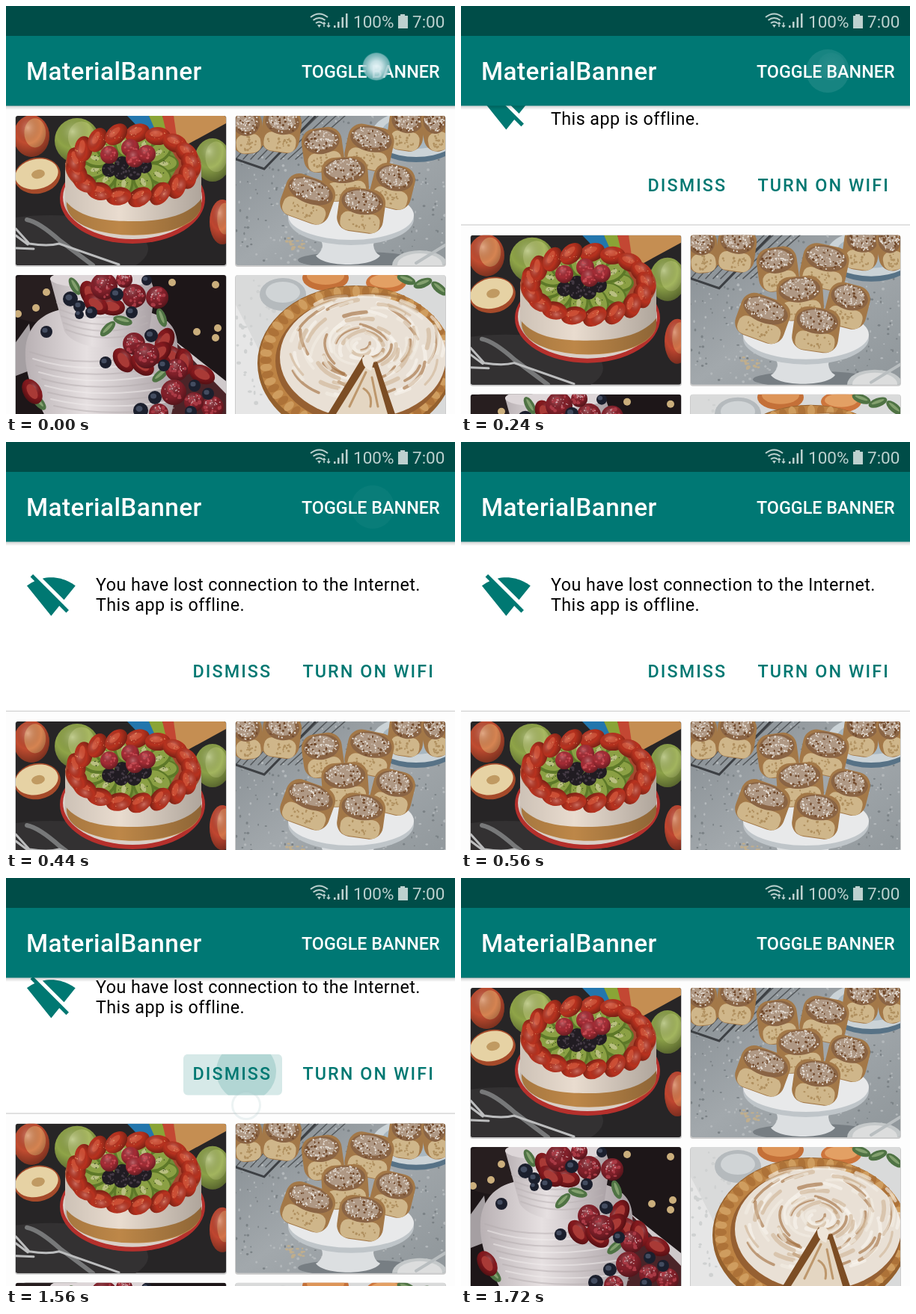
An HTML page for the animation above (2760 ms loop, 600 by 546 pixels).

```html
<!DOCTYPE html>
<html lang="en">
<head>
<meta charset="utf-8">
<style>
  html, body { margin: 0; width: 100%; height: 100%; overflow: hidden; background: #fdfdfd; }
  svg { display: block; width: 600px; height: 546px; font-family: Roboto, sans-serif; }
  .medium { font-weight: 500; font-size: 23.33px; }
  .title { font-size: 33.33px; letter-spacing: .417px; }
  .button { fill: #007872; letter-spacing: 2.083px; }
  .body { font-size: 23.33px; letter-spacing: .417px; }
  .status { font-size: 22.5px; }
</style>
</head>
<body>
<svg viewBox="0 0 600 546">
  <defs>
    <radialGradient id="glow">
      <stop offset="0" stop-color="#e4f3f6"/>
      <stop offset=".4" stop-color="#cfe6ea" stop-opacity=".95"/>
      <stop offset=".75" stop-color="#9cc8cc" stop-opacity=".85"/>
      <stop offset=".92" stop-color="#9cc8cc" stop-opacity=".7"/>
      <stop offset="1" stop-color="#9cc8cc" stop-opacity=".1"/>
    </radialGradient>
    <linearGradient id="shade" x2="0" y2="1">
      <stop stop-opacity=".2"/><stop offset="1" stop-opacity="0"/>
    </linearGradient>
    <linearGradient id="side">
      <stop stop-opacity=".12"/><stop offset=".4" stop-opacity="0"/><stop offset="1" stop-opacity=".25"/>
    </linearGradient>
    <radialGradient id="sphere" cx=".4" cy=".3" r=".75">
      <stop stop-color="#fff" stop-opacity=".3"/><stop offset=".5" stop-opacity="0"/><stop offset="1" stop-opacity=".4"/>
    </radialGradient>
    <linearGradient id="stone" x2="1" y2="1">
      <stop stop-color="#858c91"/><stop offset=".5" stop-color="#a2a8ac"/><stop offset="1" stop-color="#8f969a"/>
    </linearGradient>
    <linearGradient id="icing">
      <stop stop-color="#b9b1b4"/><stop offset=".4" stop-color="#e6e0e1"/><stop offset="1" stop-color="#a89fa3"/>
    </linearGradient>
    <clipPath id="buttonClip"><rect x="237" y="281" width="132" height="55" rx="6"/></clipPath>
  </defs>

  <g id="grid"></g>

  <g id="banner">
    <rect y="133" width="600" height="227" fill="#fff"/>
    <rect y="359.5" width="600" height="1.5" fill="#d8d8d8"/>
    <path transform="translate(27 173) scale(2.78)" fill="#007872" d="M23.64 7c-.45-.34-4.93-4-11.64-4-1.5 0-2.89.19-4.15.48L18.18 13.8 23.64 7zm-6.6 8.22L3.27 1.44 2 2.72l2.05 2.06C1.91 5.76.59 6.82.36 7L12 21.5l3.91-4.87 3.32 3.32 1.27-1.27z"/>
    <text class="body" x="120" y="199">You have lost connection to the Internet.</text>
    <text class="body" x="120" y="226">This app is offline.</text>
    <g clip-path="url(#buttonClip)" fill="#007872">
      <rect id="press" x="237" y="281" width="132" height="55"/>
      <circle id="spread" cx="321" cy="304"/>
    </g>
    <text class="medium button" x="249.5" y="315">DISMISS</text>
    <text class="medium button" x="396.5" y="315">TURN ON WIFI</text>
  </g>

  <rect y="133" width="600" height="6" fill="url(#shade)"/>
  <rect width="600" height="133.5" fill="#007874"/>
  <rect width="600" height="40" fill="#004d48"/>
  <g fill="#bdd1cf" stroke="#bdd1cf" stroke-width="0">
    <g fill="none" stroke-width="2">
      <path d="M407 15q11.500-9 23 0M410.500 19q8-6 16 0M414 23q4.500-3.500 9 0"/>
      <path d="M425 28v-6m-2 2 2-2 2 2M431 22v6m-2-2 2 2 2-2" stroke-width="1.500"/>
    </g>
    <path d="M416 25h5l-2.500 4zM438 26h2.500v3h-2.500zM443 21h2.500v8h-2.500zM448.500 15h2.500v14h-2.500zM454 10h2.500v19h-2.500zM527 11h6v2h4v17h-13V13h3z"/>
    <text class="status" x="464" y="29">100%</text>
    <text class="status" x="543" y="29">7:00</text>
  </g>
  <circle id="ripple" cx="490" cy="87" r="29" fill="#fff"/>
  <g class="medium" fill="#fff">
    <text class="title" x="27" y="99">MaterialBanner</text>
    <text x="395" y="96">TOGGLE BANNER</text>
  </g>
  <circle id="tap" cx="495" cy="81" r="19" fill="url(#glow)"/>
  <circle id="ring" cx="321" cy="304" r="18.500" fill="#fff" fill-opacity=".45" stroke="#b4cfd2" stroke-width="3"/>
</svg>

<script>
const $ = id => document.getElementById(id);
let seed = 7;
const rnd = (a = 0, b = 1) => {
  seed = seed * 16807 % 2147483647;
  return a + (b - a) * seed / 2147483647;
};
const repeat = (n, make) => Array.from({ length: n }, (_, i) => make(i)).join('');
const oval = (x, y, rx, ry, fill, turn = 0, more = '') =>
  `<ellipse cx="${x}" cy="${y}" rx="${rx}" ry="${ry}" fill="${fill}" transform="rotate(${turn} ${x} ${y})" ${more}/>`;
const ball = (x, y, rx, ry, fill, turn) => oval(x, y, rx, ry, fill, turn) + oval(x, y, rx, ry, 'url(#sphere)', turn);
const shape = (d, fill, more = '') => `<path d="${d}" fill="${fill}" ${more}/>`;
const line = (d, color, width, more = '') =>
  shape(d, 'none', `stroke="${color}" stroke-width="${width}" stroke-linecap="round" ${more}`);
const dust = (n, x, y, rx, ry, fill, size = 1) => repeat(n, () => {
  const a = rnd(0, 6.283), r = Math.sqrt(rnd());
  return oval(x + rx * r * Math.cos(a), y + ry * r * Math.sin(a), rnd(.4, 1) * size, rnd(.4, 1) * size, fill);
});
const each = (points, make) => points.map(p => make(...p)).join('');

const strawberry = (x, y, turn) =>
  ball(x, y, 17, 12, '#b8321f', turn) + oval(x - 2, y - 3, 9, 4, '#dc6244', turn, 'opacity=".6"') + dust(6, x, y, 12, 8, '#e59a6c', .8);
const halfBerry = (x, y, turn) =>
  ball(x, y, 18, 12, '#85191e', turn) + oval(x, y, 11, 6, '#a93a36', turn);
const raspberry = (x, y, r = 14) =>
  ball(x, y, r, r, '#83202a') + dust(12, x, y, r * .8, r * .8, '#a93a45', 3) + dust(14, x, y - r * .3, r * .7, r * .5, '#d5b0b5', 1.1);
const blueberry = (x, y, r = 8) =>
  oval(x, y, r, r, '#1b1f2d') + oval(x - 2, y - 2, r * .45, r * .4, '#434c60');
const leaf = (x, y, turn) => oval(x, y, 13, 6, '#4f7344', turn) + oval(x, y - 1, 9, 2, '#83a06e', turn);

const bun = (x, y, turn, w = 29) =>
  `<g transform="rotate(${turn} ${x} ${y})">
    <rect x="${x - w}" y="${y - 27}" width="${2 * w}" height="59" rx="18" fill="#a37848"/>
    <rect x="${x - w + 5}" y="${y + 6}" width="${2 * w - 9}" height="25" rx="10" fill="#cfb68a"/>
    ${dust(18, x, y + 18, w - 10, 9, '#b0905f', 2)}
    ${oval(x, y - 9, w - 3, 17, '#8a6444')}
    ${oval(x - 1, y - 11, w - 8, 13, '#d5ccc3', 0, 'opacity=".5"')}
    ${dust(60, x, y - 10, w - 5, 15, '#e4ddd5', 1.4)}
    ${dust(16, x, y - 8, w - 6, 14, '#71492b', 2)}
  </g>`;

const apple = (x, y, rx, ry, main, light) =>
  oval(x, y, rx, ry, main) + oval(x + rx * .2, y - ry * .15, rx * .6, ry * .7, light, 0, 'opacity=".55"') + oval(x, y, rx, ry, 'url(#sphere)');

const fruitCake = () =>
  shape('M13 147h281v200H13z', '#272526') + oval(60, 325, 130, 45, '#333132') +
  shape('M162 147h29l14 25-17 2z', '#2376ad') + shape('M191 147h18l9 25-15 2z', '#8aa436') +
  shape('M209 147h15l8 26-16 4z', '#c34733') + shape('M224 147h70v10l-53 29-12-5z', '#c58e52') +
  apple(34, 174, 24, 28, '#c04c30', '#e9b36d') + apple(95, 180, 30, 30, '#8fa448', '#bfca78') +
  apple(276, 206, 24, 29, '#8ba048', '#b9c674') + apple(289, 289, 17, 30, '#c04630', '#e59c60') +
  oval(42, 227, 31, 24, '#a54a2a', -10) + oval(41, 225, 29, 20, '#e6d2a4', -12) + oval(43, 225, 9, 6, '#c09a62', -12) +
  line('M28 286q16 3 44 28l44 33', '#777879', 6) + line('M13 298l18 20M13 307l16 12M13 324l24 1M31 318q25 4 40 0l80 28', '#bcbdbe', 3) +
  oval(169, 258, 97, 60, '#b5302c') + oval(169, 256, 93, 56, '#d9cfc7') +
  shape('M81 220v47c5 53 175 53 180 0v-47z', '#bd8748') +
  shape('M79 210v50c20 26 60 28 90 28s72-4 92-30v-48z', '#e9dccf') +
  shape('M79 210v57c7 52 175 52 182 0v-57z', 'url(#side)') + oval(170, 214, 91, 48, '#a4492f') +
  oval(164, 211, 64, 38, '#728b38') +
  repeat(11, i => {
    const a = i * 6.283 / 11, x = 164 + 47 * Math.cos(a), y = 211 + 27 * Math.sin(a);
    return oval(x, y, 20, 13, '#5d7828', a * 57) + oval(x, y - 1, 17, 10, '#8ba044', a * 57) + oval(x, y, 6, 3, '#b9bf80', a * 57) + dust(6, x, y, 9, 5, '#30421a', .9);
  }) +
  repeat(17, i => {
    const a = i * 6.283 / 17 - 1.5;
    return strawberry(170 + 77 * Math.cos(a), 213 + 43 * Math.sin(a), a * 57 + 65);
  }) +
  each([[138, 219], [155, 211], [171, 223], [185, 214], [154, 223]], (x, y) => oval(x, y, 10, 10, '#211c22') + dust(9, x, y, 8, 8, '#443a44', 2)) +
  each([[138, 199], [166, 190], [172, 204], [188, 198]], (x, y) => ball(x, y, 12, 12, '#a52c35') + dust(10, x, y, 9, 9, '#c54b53', 2));

const rolls = () =>
  shape('M307 147h280v200H307z', 'url(#stone)') + dust(260, 447, 250, 170, 120, '#b3b8bb', 2) + dust(200, 447, 250, 170, 120, '#7b8286', 2) +
  repeat(9, i => line(`M${307 + i * 10} 205l${50 + i * 2}-58`, '#53575a', 1.5)) + line('M307 205l38 13 68-70', '#3d4044', 3) +
  bun(322, 166, -5, 21) + bun(368, 164, 8, 26) +
  oval(548, 176, 60, 33, '#577286') + oval(548, 171, 59, 31, '#cbd3d7') + oval(548, 169, 46, 22, '#a8b7c1') +
  bun(535, 162, 8, 24) + bun(574, 163, -10, 18) +
  oval(470, 340, 80, 11, '#777e83') + shape('M412 306q14 9 10 19q-4 8-8 9c10 16 76 16 86 0q-8-4-9-14q0-8 10-14z', '#dcdfe1') +
  oval(461, 285, 84, 35, '#bfc5c9') + oval(461, 280, 84, 33, '#e8e9ea') +
  bun(423, 190, -8, 27) + bun(486, 187, 12, 31) + bun(453, 229, -4, 31) + bun(517, 239, 14, 28) + bun(404, 256, 20, 34) + bun(475, 271, 8, 31) +
  dust(18, 388, 317, 14, 10, '#c0ae8d', 2.5) + oval(553, 347, 37, 20, '#c4c8c9') + oval(553, 346, 30, 15, '#dcdddd') +
  line('M548 344l39-24', '#b9bec0', 4);

const tieredCake = () =>
  shape('M13 360h281v200H13z', '#1d1618') + oval(60, 390, 70, 35, '#271e1f') +
  each([[54, 383], [40, 404], [222, 370], [280, 373], [255, 436], [280, 444], [283, 431], [16, 412]], (x, y) => oval(x, y, 5, 5, '#e9c98e', 0, 'opacity=".85"')) +
  shape('M13 450l18-25 8 60-26 10z', '#a59fa2') + shape('M228 450l66 52v44h-85z', '#cfc9cb') + shape('M222 445l72 74v27h-85z', '#4b2428') +
  shape('M26 460c2-30 20-47 44-53l110 0c25 5 48 15 49 45l2 50-13 58H58C40 525 24 495 26 460z', 'url(#icing)') +
  shape('M59 365c4-15 113-15 134 0l6 18-8 54c-25 27-96 27-113-2z', 'url(#icing)') + oval(126, 365, 67, 13, '#ddd6d8') +
  repeat(9, i => line(`M${32 + i * 4} ${463 + i * 9}q70 ${24 - i} 160 3`, i % 2 ? '#f2eeee' : '#b3abae', 2, 'opacity=".5"')) +
  repeat(5, i => line(`M${68 + i * 3} ${397 + i * 9}q55 22 112 0`, '#b9b1b4', 2, 'opacity=".5"')) +
  each([[92, 375, 60], [136, 432, -45], [156, 421, 15], [208, 417, 70], [206, 494, -40], [44, 530, 50]], leaf) +
  each([[112, 385, 65], [141, 402, 10], [120, 399, 35], [157, 474, 55], [212, 448, -65], [224, 470, 50], [205, 464, -40], [262, 493, 25], [35, 516, 60], [238, 476, 80], [182, 480, 40]], halfBerry) +
  each([[131, 375, 18], [171, 388, 16], [202, 390, 15], [171, 452, 15], [188, 468, 17], [228, 487, 15], [224, 517, 17], [276, 537, 15], [204, 545, 13], [251, 530, 13], [158, 366, 11]], raspberry) +
  each([[86, 392, 10], [98, 402], [114, 410], [148, 386, 9], [168, 410], [188, 367, 7], [54, 436], [133, 477], [194, 441, 9], [211, 481], [180, 541, 10], [199, 524, 9], [252, 508], [270, 519], [98, 413, 6], [247, 543]], blueberry);

const pie = () =>
  shape('M307 360h280v200H307z', '#d9dada') + shape('M307 400l75 146h-75z', '#e6e6e6') + dust(70, 350, 440, 50, 100, '#cfd1d1', 3) +
  oval(370, 386, 31, 22, '#b5babd') + oval(370, 383, 23, 14, '#d0d4d6') +
  oval(427, 364, 31, 17, '#c47038') + oval(427, 361, 25, 12, '#dd9558') + oval(508, 370, 27, 14, '#cd753c') + oval(508, 368, 22, 9, '#e3a064') +
  each([[535, 366, 20], [557, 371, -20], [579, 378, 40]], leaf) +
  oval(467, 478, 131, 104, '#94602d') + oval(468, 474, 129, 99, '#bd8344') +
  repeat(60, i => {
    const a = i * 6.283 / 60;
    return oval(468 + 121 * Math.cos(a), 474 + 92 * Math.sin(a), 8, 5, i % 2 ? '#cf9d5f' : '#ad7238', a * 57);
  }) +
  oval(474, 475, 114, 86, '#966032') + oval(477, 470, 111, 82, '#e9e0d5') +
  repeat(32, i => {
    const k = 1 + i % 8, tone = ['#fbf7f0', '#a06c3a', '#cfb495', '#f4eee5'][i >> 3];
    return oval(480 + rnd(-7, 7), 457 + rnd(-5, 5), k * 12.5, k * 8.5, 'none', rnd(-25, 25),
      `stroke="${tone}" stroke-width="${rnd(3, 6)}" stroke-dasharray="${rnd(15, 50)} ${rnd(30, 90)}" stroke-linecap="round" opacity=".6"`);
  }) +
  shape('M478 467l-48 79h90l-24-70-12 3z', '#7c4d24') + shape('M481 482l-40 64h69l-18-62z', '#e4d6c2') +
  line('M481 490l-22 46M489 497l8 39M478 512q12 7 9 24', '#bd976c', 3) + shape('M476 471q9-10 16 3l-4 14q-12-3-12-17z', '#eee5d9');

const card = (x, y, width, photo, i) =>
  `<clipPath id="card${i}"><rect x="${x}" y="${y}" width="${width}" height="200" rx="3"/></clipPath>
   <rect x="${x - 1}" y="${y}" width="${width + 2}" height="202" rx="4" opacity=".2"/>
   <g clip-path="url(#card${i})">${photo()}</g>`;

$('grid').innerHTML = [
  [13, 147, 281, fruitCake], [307, 147, 280, rolls], [13, 360, 281, tieredCake], [307, 360, 280, pie]
].map((c, i) => card(...c, i)).join('');

const LOOP = 2760, STEP = 40, HEIGHT = 227;
const ramp = (t, from, to) => Math.min(1, Math.max(0, (t - from) / (to - from)));
const ease = x => (1 - Math.cos(Math.PI * x)) / 2;
const set = (id, name, value) => $(id).setAttribute(name, value);

function draw(now) {
  const t = Math.floor(now % LOOP / STEP) * STEP;
  const open = HEIGHT * (ease(ramp(t, 126, 306)) - ease(ramp(t, 1507, 1687)));
  set('grid', 'transform', `translate(0 ${open})`);
  set('banner', 'transform', `translate(0 ${open - HEIGHT})`);

  set('tap', 'opacity', 1 - ramp(t, 0, 260));
  set('ripple', 'opacity', .09 * ramp(t, 0, 120) * (1 - ramp(t, 280, 540)));

  set('ring', 'opacity', t < 1400 ? 0 : .85 * (1 - ramp(t, 1460, 1600)));
  set('press', 'opacity', t < 1720 ? .16 * ramp(t, 1400, 1480) : 0);
  set('spread', 'opacity', t > 1400 && t < 1720 ? .17 : 0);
  set('spread', 'r', 60 * ramp(t, 1400, 1640));
  requestAnimationFrame(draw);
}
requestAnimationFrame(draw);
</script>
</body>
</html>
```
